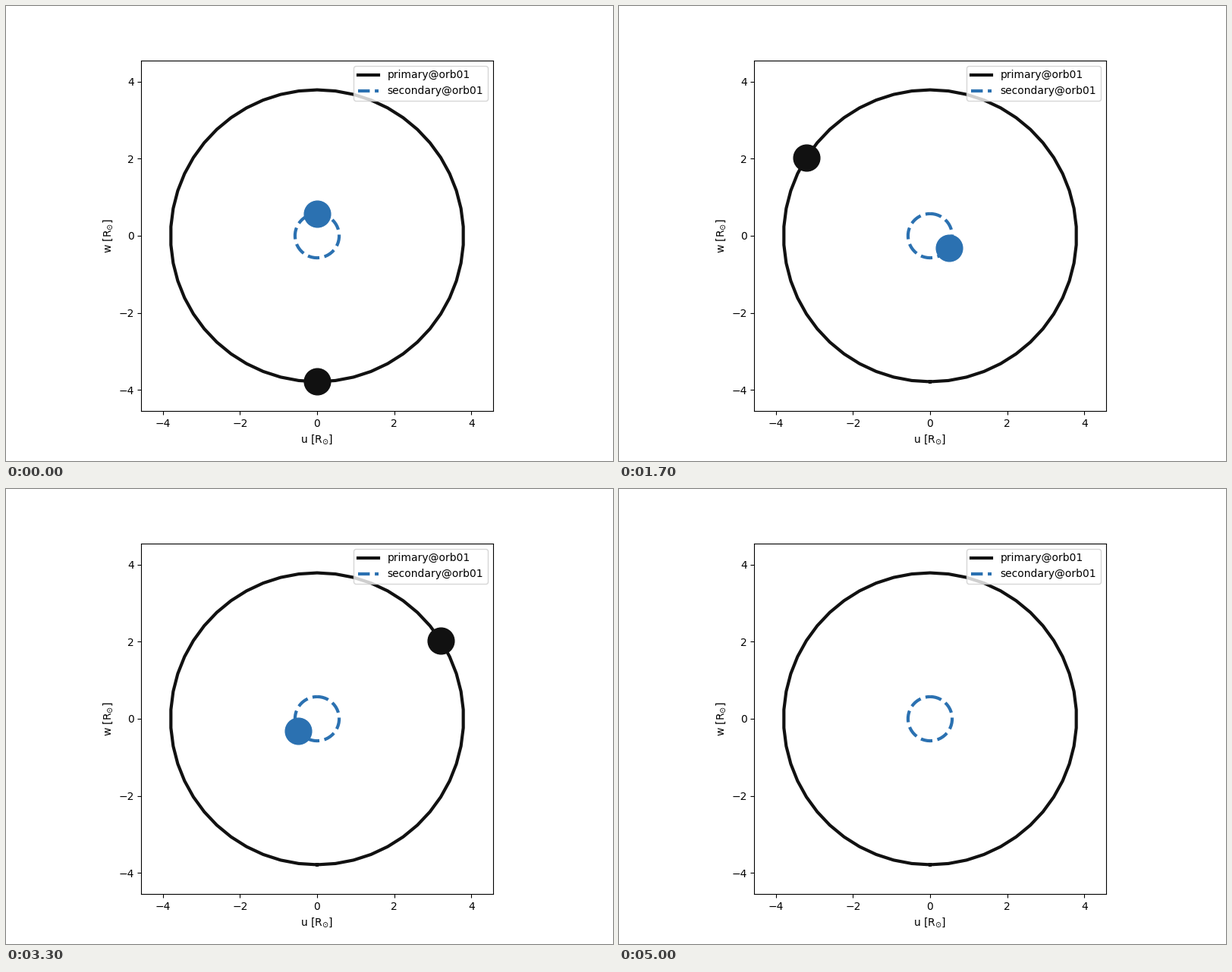
These frames come from a looping animation (800 px wide and 600 px high, 5100 ms). A matplotlib script:

```python
import numpy as np
import matplotlib.pyplot as plt
from matplotlib.animation import FuncAnimation

STEPS = 50              # steps in one full orbit
FRAMES = STEPS + 1      # the last frame shows the empty orbits
INTERVAL = 100
BLACK, BLUE = "#111111", "#2B71B1"
LEGEND_LEFT, LEGEND_BOTTOM = 0.955, 3.494   # edges of the right-hand legend


def primary(step):
    phase = 2 * np.pi * step / STEPS
    return -3.8 * np.sin(phase), -3.788 * np.cos(phase)


def secondary(step):
    phase = 2 * np.pi * step / STEPS
    return 0.573 * np.sin(phase), 0.573 * np.cos(phase)


fig, ax = plt.subplots(figsize=(8, 6), dpi=100)
fig.subplots_adjust(left=0.125, right=0.9, bottom=0.11, top=0.88)
ax.set_aspect("equal")
ax.set_xlim(-4.56, 4.56)
ax.set_ylim(-4.547, 4.547)
ax.set_xticks(range(-4, 5, 2))
ax.set_yticks(range(-4, 5, 2))
ax.set_xlabel(r"u [$\mathrm{R_{\odot}}$]")
ax.set_ylabel(r"w [$\mathrm{R_{\odot}}$]")

bodies = []
steps = np.arange(FRAMES)
for orbit, color, style, label in (
    (primary, BLACK, "-", "primary@orb01"),
    (secondary, BLUE, "--", "secondary@orb01"),
):
    ax.plot(*orbit(steps), style, color=color, lw=3, label=label)
    body, = ax.plot([], [], "o", color=color, ms=25, mew=1, zorder=3)
    bodies.append((body, orbit))

legend_left = ax.legend(loc="upper left")
ax.add_artist(legend_left)
legend_right = ax.legend(loc="upper right")


def update(frame):
    for body, orbit in bodies:
        u, w = orbit(frame)
        body.set_data([u], [w])
        body.set_visible(frame < STEPS)

    # The legend jumps to the other corner while the primary is beneath it.
    u, w = primary(frame)
    covered = u > LEGEND_LEFT and w > LEGEND_BOTTOM
    legend_left.set_visible(covered)
    legend_right.set_visible(not covered)
    return [body for body, _ in bodies] + [legend_left, legend_right]


anim = FuncAnimation(fig, update, frames=FRAMES, interval=INTERVAL,
                     repeat=True, repeat_delay=0)
plt.show()
```
